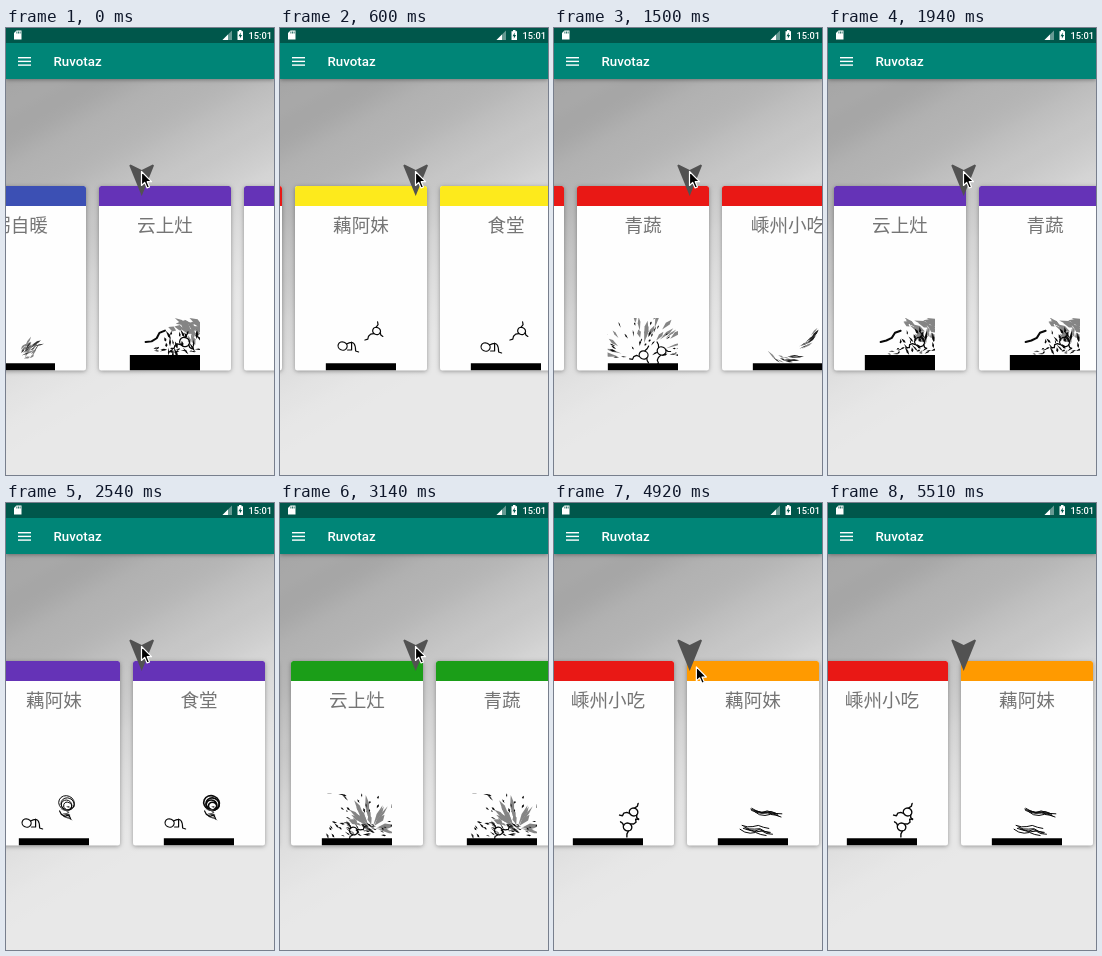
Animation, 268 px wide and 447 px high, one loop 5.79 s. Source, as an HTML page with a canvas:

```html
<!DOCTYPE html>
<html lang="zh-CN">
<head>
<meta charset="utf-8">
<title>Ruvotaz</title>
<style>
html, body { margin: 0; width: 100%; height: 100%; overflow: hidden; background: #e6e6e6; }
canvas { display: block; width: 268px; height: 447px; }
</style>
</head>
<body>
<canvas id="stage"></canvas>
<script>
const W = 268, H = 447, LOOP = 5790, PITCH = 145, CARD_W = 132;
const BLACK = '#080808', GREY = '#858585';
const canvas = document.getElementById('stage');
const dpr = window.devicePixelRatio || 1;
canvas.width = W * dpr;
canvas.height = H * dpr;
const c = canvas.getContext('2d');
c.scale(dpr, dpr);

const clamp = v => Math.min(1, Math.max(0, v));
const smooth = v => (v = clamp(v), v * v * (3 - 2 * v));

// ---------- timing: the picture is refreshed about every 149 ms ----------
const tickStart = k => 150 * k - 10 * Math.floor(k / 11) - (k > 35 ? 10 : 0);
function tick(t) {
  let k = 37;
  while (k && tickStart(k) > t) k--;
  return k;
}
// Nearly constant speed, then a short decelerating stop.
const keys = [[140, 52], [600, 1435], [1500, 4617], [2540, 8428], [3140, 10574], [3880, 13180]];
function scrollAt(t) {
  const n = keys.findIndex(key => key[0] > t);
  if (n < 0) return 13497 - 317 * (1 - clamp((t - 3880) / 179)) ** 2;
  if (n === 0) return keys[0][1];
  const [t0, x0] = keys[n - 1], [t1, x1] = keys[n];
  return Math.round(x0 + (x1 - x0) * (t - t0) / (t1 - t0));
}

// ---------- sketch helpers ----------
let seed = 1;
const rnd = () => (seed = (seed * 16807) % 2147483647) / 2147483647;
const between = (a, b) => a + (b - a) * rnd();
function reseed(n) {
  seed = n * 7919 + 17;
  rnd(); rnd();
}
function stroke(w, color = BLACK) {
  c.lineWidth = w;
  c.strokeStyle = color;
  c.stroke();
}
function ring(x, y, r, w = 1.2) {
  c.beginPath();
  c.ellipse(x, y, r, r * 0.9, 0.4, 0, 7);
  stroke(w);
}
function wiggle(x, y, angle, steps, step, bend, w = 1.2) {
  c.beginPath();
  c.moveTo(x, y);
  for (let i = 0; i < steps; i++) {
    const a = angle + bend * Math.sin(i * 2 + 1) + between(-0.2, 0.2);
    c.lineTo(x += step * Math.cos(a), y += step * Math.sin(a));
  }
  stroke(w);
}
function figure(x, y, r, angle, w = 1.2) {
  ring(x, y, r, w);
  const at = (a, ...rest) => wiggle(x + r * Math.cos(a), y + r * Math.sin(a), a, ...rest, w);
  at(angle, 4, 3, 0.8);
  at(angle + 2.2, 2, 3, 0.9);
  at(angle - 2, 2, 2.5, 0.9);
}
function crawler(x, y) {
  ring(x, y, 4.6);
  c.beginPath();
  c.moveTo(x + 4, y - 2);
  c.bezierCurveTo(x + 12, y - 7, x + 13, y, x + 13, y + 5);
  c.lineTo(x + 16, y + 6);
  c.moveTo(x + 9, y - 4);
  c.lineTo(x + 9, y + 4);
  c.lineTo(x + 5, y + 4);
  stroke(1.2);
}
function dash(x, y, len, angle, w, color) {
  c.save();
  c.translate(x, y);
  c.rotate(angle);
  poly(color, 0, 0, len * 0.65, w, len, 0, len * 0.55, -w);
  c.restore();
}
// Strokes flying outwards from x, y between two angles and radii.
function burst(x, y, r0, r1, a0, a1, n, len, w, color) {
  for (let i = 0; i < n; i++) {
    const a = between(a0, a1), r = between(r0, r1);
    dash(x + r * Math.cos(a), y + r * Math.sin(a), len * between(0.5, 1.4), a + between(-0.2, 0.2), w * between(0.5, 1.2), color);
  }
}
function scatter(x, y, w, h, n, len, angle, thick, color) {
  for (let i = 0; i < n; i++)
    dash(x + w * rnd(), y + h * rnd(), len * between(0.5, 1.4), angle + between(-0.5, 0.5), thick * between(0.4, 1), color);
}

// ---------- themes: header colour and sketch in a 70 x 52 box; n is the place in the run ----------
const themes = {
  I: ['#3c50b4', () => {
    scatter(36, 27, 12, 14, 15, 11, -0.75, 1.6, GREY);
    scatter(36, 27, 14, 14, 10, 8, -0.75, 1, '#333');
  }],
  P: ['#6533b7', () => {
    scatter(38, -1, 26, 10, 16, 13, 0.4, 3, GREY);
    scatter(50, 6, 18, 14, 8, 9, 1.2, 3, GREY);
    scatter(34, 8, 34, 24, 20, 8, 1.2, 1.4, BLACK);
    scatter(22, 31, 46, 5, 14, 5, -0.3, 1, BLACK);
    wiggle(16, 24, -0.6, 4, 6, 0.5, 2);
    figure(55, 24, 5, 2.6, 1.3);
  }, 37],
  p: ['#6533b7', n => {
    crawler(8 - 2 * n, 30);
    for (let i = 0; i < 4; i++) ring(48 + i % 2, 10 + i, 8 - i * 1.3, 1 + 0.6 * n);
    scatter(40, 11, 8, 13, 10, 7, 0.5, 1, '#444');
    wiggle(41, 18, 0.4, 4, 4, 0.8);
  }],
  Y: ['#fdea1c', n => {
    crawler(17 - 2 * n, 28 + n);
    figure(51, 13, 4, 2.4);
  }],
  R: ['#e91815', n => {
    const fall = Math.max(0, n - 1);
    for (let i = 0; i < 26 * fall; i++) {
      const u = rnd();
      dash(15 + 44 * u, 34 + 8 * Math.sin(u * 4) - 8 * u + between(-4, 4), between(5, 13), 0.8 - 1.7 * u, between(0.5, 1.1), i % 3 ? '#222' : GREY);
    }
    if (fall) return;
    burst(34, 42, 17, 38, -3, -0.25, 20, 14, 1.9, GREY);
    burst(33, 42, 12, 46, -3.1, -0.1, 30, 5, 0.9, BLACK);
    figure(36, 37, 4.5, 2.8);
    figure(54, 33, 4.5, 1.8);
  }],
  r: ['#e91815', n => {
    const dust = 2 - n;
    scatter(58, 0, 10, 9, 8 * dust, 9, 0.9, 1.8, GREY);
    scatter(16, 31, 16, 7, 6 * dust, 11, -0.2, 1.6, GREY);
    scatter(42, 27, 18, 14, 3 * dust, 5, 0.8, 1, BLACK);
    figure(49 + 6 * n, 19, 4.3, 2.8, 1.4);
    figure(65 - 5 * n, 34, 4.3, -0.8, 1.4);
  }],
  G: ['#1b9e18', () => {
    scatter(4, 0, 22, 5, 4, 9, 0.3, 1.1, BLACK);
    burst(50, 36, 2, 13, -3, 0.1, 22, 17, 2.4, GREY);
    scatter(24, 24, 26, 14, 9, 8, 0.6, 1.8, GREY);
    scatter(2, 29, 60, 14, 32, 6, 0.5, 1, BLACK);
    burst(48, 36, 16, 33, -3.1, 0, 18, 4, 0.9, BLACK);
    figure(32, 38, 4.2, -0.4);
  }],
  O: ['#ff9a00', () => {
    for (let i = 0; i < 10; i++) {
      const low = i % 2;
      wiggle(between(32, 42) - 10 * low, between(14, 20) + 17 * low, 0.1, 5, 5.5, 0.35, 1);
    }
  }]
};
const runs = 'IPGrYOpGYrORIGYPOIRGpIYOrGPIYGOrO';
const names = ['粥自暖', '云上灶', '青蔬', '嵊州小吃', '藕阿妹', '食堂'];

// ---------- scene ----------
function poly(color, ...p) {
  c.fillStyle = color;
  c.beginPath();
  for (let i = 0; i < p.length; i += 2) c.lineTo(p[i], p[i + 1]);
  c.closePath();
  c.fill();
}
function box(color, x, y, w, h, r = 0) {
  c.fillStyle = color;
  c.beginPath();
  c.roundRect(x, y, w, h, r);
  c.fill();
}
function raised(...args) {
  c.save();
  c.shadowColor = 'rgba(0,0,0,.35)';
  c.shadowBlur = 4 * dpr;
  c.shadowOffsetY = dpr;
  box(...args);
  c.restore();
}
function text(str, x, y, font, color, align) {
  c.font = font;
  c.fillStyle = color;
  c.textAlign = align;
  c.fillText(str, x, y);
}
function backdrop() {
  const g = c.createLinearGradient(0, 52, 239, 468);
  for (let u = 0; u <= 1; u += 0.02) {
    const v = Math.round(165 + 67 * smooth(u / 0.7) + 3 * Math.sin(u * 45) * clamp(1 - u * 1.8));
    g.addColorStop(u, `rgb(${v},${v},${v})`);
  }
  box(g, 0, 0, W, H);
}
function bars() {
  raised('#008577', 0, 14, W, 37);
  box('#00574b', 0, 0, W, 15);
  for (let i = 0; i < 3; i++) box('#fff', 12, 29 + i * 3.7, 13, 1.4);
  text('Ruvotaz', 47.5, 38.3, '500 13.3px Roboto, sans-serif', '#fff', 'left');
  text('15:01', 266, 10.8, '500 9.3px Roboto, sans-serif', '#fff', 'right');

  poly('#fff', 10.5, 2.5, 15.5, 2.5, 15.5, 11.5, 8, 11.5, 8, 5);
  for (let i = 0; i < 3; i++) box('#00574b', 10.5 + i * 1.6, 3.5, 0.8, 2);
  poly('rgba(255,255,255,.4)', 226, 2.5, 226, 12, 216.5, 12);
  poly('#fff', 222, 6.5, 222, 12, 216.5, 12);
  box('#fff', 231.5, 3.2, 5.5, 8.8);
  box('#fff', 233, 2, 2.5, 2);
  poly('#00574b', 234.8, 4.5, 232.5, 8.2, 234, 8.2, 233.8, 10.8, 236.1, 7.1, 234.6, 7.1);
}
function card(i, x) {
  const run = Math.floor((i + 2) / 3), n = (i + 2) % 3;
  const [color, sketch, floor = 45.2] = themes[runs[run]];
  raised('#fefefe', x, 158, CARD_W, 184.5, 2.5);
  box(color, x, 158, CARD_W, 20, [2.5, 2.5, 0, 0]);
  text(names[i % names.length], x + 66, 203.8, '500 18.6px "Noto Sans CJK SC", "Noto Sans CJK", sans-serif', '#757575', 'center');

  c.save();
  c.translate(x + 30.6, 290);
  c.beginPath();
  c.rect(0, 0, 70.4, 52.5);
  c.clip();
  reseed(run + 3);
  sketch(n);
  box('#000', 0, floor, 70.4, 52.5 - floor);
  c.restore();
}
function cursor(k) {
  if (k > 36) return;
  const u = smooth((k - 32.4) / 3.6);
  c.save();
  c.translate(135.5 + 92.5 * u, 143.5 + 274.5 * u);
  poly('#000', 0, 0, 0, 14, 3.2, 11, 5.6, 16.5, 8, 15.5, 5.7, 10.2, 10, 10.2);
  stroke(1.2, '#fff');
  c.restore();
}
function draw(t) {
  const k = tick(t), offset = scrollAt(tickStart(k));
  c.lineCap = c.lineJoin = 'round';
  backdrop();
  bars();
  const first = Math.max(0, Math.floor((offset - CARD_W) / PITCH));
  for (let i = first; i * PITCH - offset < W + 3; i++) card(i, i * PITCH - offset);
  poly('#525252', 123.3, 137.5, 124.5, 136.5, 135.7, 142, 146.8, 136.5, 148, 137.5, 135.7, 168);
  cursor(k);
}

const begin = performance.now();
function loop(now) {
  draw(Math.max(0, now - begin) % LOOP);
  requestAnimationFrame(loop);
}
draw(0);
requestAnimationFrame(loop);
</script>
</body>
</html>
```
